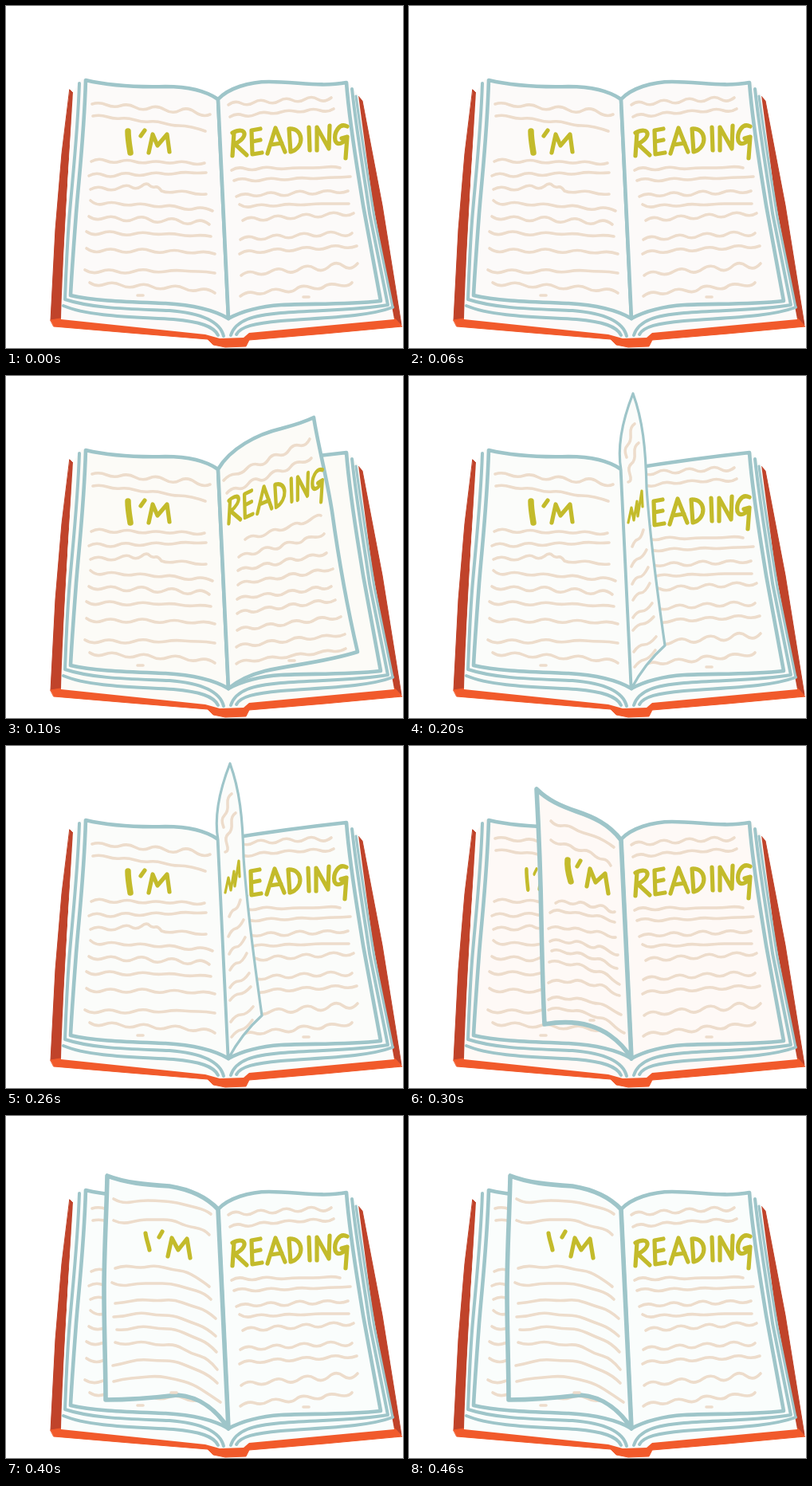
These frames come from a looping animation (498x429 px, 0.5 s). An HTML page:

```html
<!DOCTYPE html>
<html lang="en">
<head>
<meta charset="utf-8">
<title>I'm reading</title>
<style>
html, body { margin: 0; width: 100%; height: 100%; overflow: hidden; background: #fff; }
svg { display: block; width: 100vw; height: 100vh; }
path { stroke-linecap: round; stroke-linejoin: round; stroke-width: var(--w); }
.edge { --w: 4.6; stroke: #9ec5c9; }
.line { --w: 4; stroke: #9ec5c9; fill: none; }
.row { --w: 3.6; stroke: #eddccb; fill: none; }
.word { --w: 5.2; stroke: #c3bb2b; fill: none; }
.bold { --w: 7.5; }
.turn { --w: 5.6; }
.thin { --w: 3.2; }
.cover { --w: 1; fill: #c0432a; stroke: #c0432a; }
.base { --w: 1; fill: #f15a2b; stroke: #f15a2b; }
.pose {
  fill: var(--paper);
  visibility: hidden;
  animation: show .5s step-end infinite;
  animation-delay: calc(var(--i) * .1s - .5s);
}
@keyframes show {
  0% { visibility: visible; }
  20%, 100% { visibility: hidden; }
}
</style>
</head>
<body>
<svg viewBox="0 0 498 429" role="img" aria-label="An open book: I'm reading">
<defs>
  <g id="block">
    <path d="M84 108L95 92 101 92C130 99 160 101 200 101 230 102 250 108 266 117 300 112 380 98 428 94L442 112 459 240 487 393 305 410 298 416 268 417 250 412 69 393C71 320 78 210 84 108Z"/>
    <g class="line">
      <path d="M92 97C90 160 83 220 79 270 76 310 75 345 74 368 110 380 160 380 205 382 242 385 268 394 273 414"/>
      <path d="M72 376C105 390 165 390 210 393 244 396 261 402 266 413"/>
      <path d="M434 104C440 160 449 210 456 260L479 375C440 382 390 381 345 385 310 388 288 394 282 413"/>
      <path class="thin" d="M439 113C446 165 454 215 462 265L485 378"/>
      <path d="M485 378C450 391 390 391 345 395 312 398 294 402 289 412"/>
    </g>
  </g>

  <path id="left" class="edge" d="M266 117C250 106 228 101 200 101 160 102 125 99 100 93 98 160 92 210 88 260 85 300 82 340 81 363 110 370 150 371 200 373 235 375 262 382 279 392 276 330 270 200 266 117Z"/>
  <path id="right" class="edge" d="M266 117C279 103 305 95 330 95 365 95 395 102 427 96 431 150 441 205 448 250L470 370C425 375 380 373 345 375 315 377 294 384 279 392 276 330 270 200 266 117Z"/>
  <path id="next" class="edge" d="M266 118C310 111 345 105 427 96 431 150 441 205 448 250L470 370C425 375 380 373 345 375 315 377 294 384 279 392 276 330 270 200 266 118Z"/>

  <g id="head-l" class="row">
    <path d="M108 123q9-3 18 1t18 1 18 2 18 1 19 2 19 1 19 2 19 3"/>
    <path d="M109 138q9-2 18 1t17 2 18 2 18 2 18 2 18 3 17 2 17 5"/>
  </g>
  <g id="rows-l" class="row">
    <path d="M107 195q9-5 18-1t18 1 18 0 18 1 18 0 17 0 17 1 18 0"/>
    <path d="M104 213q9-5 18-1t18 0 18-1 19 0 18-1 18 0 18-1 20 0"/>
    <path d="M106 230q9-5 18-1t18-1 15-1q6 4 13-1 6-5 10-1 3 3 7 2 4-1 8 5 8 3 18 1t18 1 20 2"/>
    <path d="M106 244q8 7 17 4t19 0 19 1 19 1 19 1 19 2 19 1 22 3"/>
    <path d="M104 264q9 6 19 2t19 1 19 0 19 1 19 1 19 1 18 1 19 3"/>
    <path d="M101 283q9 6 19 2t20 0 20 1 19-1 19 1 20 1 19 1 20 1"/>
    <path d="M101 304q10 7 20 3t20 0 20 0 20 0 20 1 20 0 20 1 21 2"/>
    <path d="M99 331q10 6 20 2t20 0 21 0 20-1 20 1 21-1 20 1 21 2"/>
    <path d="M105 347q9 6 19 2t20 1 20 1 19 1 20 1 20 1 19 2 20 4"/>
    <path d="M165 363h7"/>
  </g>
  <g id="rows-r" class="row">
    <path d="M279 124q8-6 16-2t16-1 16-1 16-1 16-1 16-1 16 0 17-2"/>
    <path d="M281 139q8-5 16-2t16-1 16-2 16-1 17-1 16-1 16 0 17-2"/>
    <path d="M283 206q8-5 17-2t17 0 17-1 17 1 17-1 17 0 17-1 17 1"/>
    <path d="M286 219q9-4 18-1t18 0 18-1 19 0 18-1 18 0 18-1 19-1"/>
    <path d="M289 239q9-5 18-2t17-1 17 0 18-1 17-1 17 0 18-1 18-1"/>
    <path d="M293 249q8 5 17 2t17-1 17 0 17-1 18 0 17-1 17 0 17 0"/>
    <path d="M297 269q9-6 18-2t17-1 17-1 18-1 17-1 17-1 18-1 17-1"/>
    <path d="M294 293q9-6 18-2t18-1 17-1 17-1 18-1 17-1 18 0 17-1"/>
    <path d="M293 311q9-6 18-3t19-1 18-1 18-1 19-1 18-1 18-1 19-1"/>
    <path d="M295 338q9-7 18-3t19-2 18-1 18-2 19-1 18-2 18-1 18-3"/>
    <path d="M294 364q9-7 18-4t17-2 18-1 17-2 18-2 17-1 18-2 17-3"/>
    <path d="M373 365h7"/>
  </g>

  <g id="im" class="word">
    <path class="bold" d="M153 157C153 167 155 177 156 184"/>
    <path d="M174 156L169 163M179 184L184 161 190 175 202 161 205 183"/>
  </g>
  <g id="reading" class="word">
    <path d="M286 159L284 188M284 159C302 150 305 165 287 173L302 187"/>
    <path d="M319 154L308 156 309 186 321 184M309 170L319 168"/>
    <path d="M328 185L338 153 350 183M332 174L346 172"/>
    <path d="M355 154L357 183C375 178 374 153 355 154M380 152L381 181"/>
    <path d="M390 181L390 152 405 179 406 150"/>
    <path d="M428 151C418 146 411 159 413 169 416 176 424 172 428 164L421 166M428 164L426 191"/>
  </g>
</defs>

<path class="cover" d="M80 105L84 109 77 215 72 310 69 394 56 394 62 280 70 185Z"/>
<path class="cover" d="M441 112L447 119 472 250 496 400 487 394 458 240Z"/>
<path class="base" d="M56 394L68 392 250 411 305 409 488 392 497 402 400 411 305 419 301 427 275 428 260 425 253 418 155 410 60 402Z"/>

<g class="pose" style="--i:0;--paper:#fcfaf9">
  <use href="#block"/><use href="#left"/><use href="#right"/>
  <use href="#head-l"/><use href="#rows-l"/><use href="#im"/>
  <use href="#rows-r"/><use href="#reading"/>
</g>

<g class="pose" style="--i:1;--paper:#fcfbf7">
  <use href="#block"/><use href="#next"/><use href="#left"/>
  <use href="#head-l"/><use href="#rows-l"/><use href="#im"/>
  <path class="edge" d="M266 117C281 91 315 73 345 66 360 62 374 58 386 52 391 85 402 125 409 170 418 235 428 290 441 346 400 359 360 362 325 370 305 375 290 383 279 392 276 330 270 200 266 117Z"/>
  <g class="row">
    <path d="M273 131q7-8 15-8t14-7 14-5 13-6 13-6 13-6 13-6 13-8"/>
    <path d="M277 147q7-8 14-6t13-6 13-5 13-5 14-6 13-5 13-6 13-5"/>
    <path d="M300 205q7-6 14-4t14-4 13-4 14-4 13-4 14-5 13-5"/>
    <path d="M292 227q7-6 14-4t13-4 14-3 13-3 14-4 13-3 13-4 13-4"/>
    <path d="M291 244q7-5 14-3t14-3 14-2 14-3 14-3 14-2 14-3 13-3"/>
    <path d="M291 262q7-6 15-4t15-2 15-2 15-3 15-2 15-2 14-3 15-2"/>
    <path d="M290 280q7-5 15-3t15-2 15-1 15-2 15-2 15-2 14-2 14-2"/>
    <path d="M290 298q8-6 15-3t15-2 16-2 15-2 15-2 16-2 15-2 16-2"/>
    <path d="M290 319q8-6 16-3t16-2 16-2 16-2 17-2 16-2 16-2 17-2"/>
    <path d="M289 340q8-6 17-3t17-2 17-2 17-2 17-2 17-1 17-2 17-2"/>
    <path d="M289 361q8-6 17-4t17-2 17-2 18-2 17-2 17-2 17-2 17-3"/>
    <path d="M355 357h7"/>
  </g>
  <use href="#reading" transform="matrix(.815 -.212 0 .99 48 59)"/>
</g>

<g class="pose" style="--i:2;--paper:#fbfcfa">
  <use href="#block"/><use href="#next"/><use href="#left"/>
  <use href="#head-l"/><use href="#rows-l"/><use href="#im"/>
  <use href="#rows-r"/><use href="#reading" transform="translate(-1 1)"/>
  <path class="edge thin" d="M266 118C261 90 268 55 281 22 293 55 297 90 298 140 302 200 312 275 321 338 301 356 289 373 279 392 276 330 270 200 266 118Z"/>
  <g class="row">
    <path d="M283 60q-6 4-5 13t-4 14-1 15"/>
    <path d="M288 84q-6 4-5 13t-4 13-2 13-2 10"/>
    <path d="M280 214q3-8 7-9t7-12"/>
    <path d="M279 239q4-9 9-10t10-11"/>
    <path d="M280 261q4-9 9-9t11-12"/>
    <path d="M281 281q5-9 10-9t11-12"/>
    <path d="M281 303q5-8 11-8t13-10"/>
    <path d="M281 319q6-8 12-8t14-9"/>
    <path d="M282 346q6-9 13-9t15-10"/>
    <path d="M283 365q6-8 12-9t14-12"/>
  </g>
  <path class="word thin" d="M275 184L279 165 282 181 286 157 287 176 292 144 293 164"/>
</g>

<g class="pose" style="--i:3;--paper:#fef9f6">
  <use href="#block"/><use href="#left"/><use href="#right"/>
  <use href="#head-l" y="-7"/><use href="#rows-l"/>
  <use href="#im" transform="matrix(.6 0 0 .9 55.6 14)"/>
  <use href="#rows-r"/><use href="#reading"/>
  <path class="edge turn" d="M266 118C251 98 231 89 210 82 190 75 174 68 160 54 163 110 165 160 166 220 167 270 168 310 170 349 205 343 232 349 252 363 265 372 273 382 279 392 276 330 270 200 266 118Z"/>
  <g class="row">
    <path d="M178 94q6 7 14 6t14 3 13 6 13 4 13 6 12 8"/>
    <path d="M178 118q7 6 14 5t13 4 13 4 13 5 12 6 10 8"/>
    <path d="M184 197q7-5 14-1t13 1 12 2 13 2 12 3 10 4"/>
    <path d="M177 209q7-5 14-2t14 2 14 2 14 2 13 3 12 5"/>
    <path d="M175 229q7-4 15-1t14 1 14 2 14 2 14 3 13 4"/>
    <path d="M177 245q7-4 15 0t14 1 15 3 14 3 14 4 13 6"/>
    <path d="M179 257q7-3 14 1t14 2 14 3 14 4 13 5 13 7"/>
    <path d="M176 271q8-3 16 1t15 2 15 4 15 5 14 6 13 10"/>
    <path d="M175 297q8-5 16-2t15 0 15 2 15 3 14 5 14 8"/>
    <path d="M175 318q8-5 16-2t15 1 16 2 15 4 15 6 14 8"/>
    <path d="M175 331q8-4 17-1t16 2 16 4 16 5 15 8 15 11"/>
    <path d="M227 344h5"/>
  </g>
  <g class="word">
    <path class="bold" d="M199 143C198 153 201 163 203 170"/>
    <path d="M215 144L211 151M223 176L227 154 234 171 246 160 250 185"/>
  </g>
</g>

<g class="pose" style="--i:4;--paper:#fafdfc">
  <use href="#block"/><use href="#left"/><use href="#right"/>
  <use href="#head-l" y="-7"/><use href="#rows-l"/>
  <use href="#rows-r"/><use href="#reading"/>
  <path class="edge turn" d="M266 117C250 100 230 92 205 88 175 86 150 84 127 75 126 125 123 170 123 220 123 270 125 315 125 356 160 356 190 353 215 350 245 352 266 372 279 392 276 330 270 200 266 117Z"/>
  <g class="row">
    <path d="M135 104q10 6 22 4t21-2 21 1 20 3 20 5 18 8"/>
    <path d="M135 131q10 5 22 2t20-3 20 0 20 4 20 6 18 9"/>
    <path d="M137 191q10-4 21-2t20 0 20 1 20 4 20 8 17 12"/>
    <path d="M133 209q10 5 21 3t21-2 21 0 21 3 21 6 19 11"/>
    <path d="M137 235q11-1 21-3t21-1 21 0 21 3 21 7 21 13"/>
    <path d="M135 252q11 0 22-3t21-1 21 2 21 4 21 8 22 14"/>
    <path d="M139 268q11 1 21-2t21-1 21 2 21 5 21 9 20 15"/>
    <path d="M137 284q11 4 22 1t21 0 21 2 21 5 21 9 22 17"/>
    <path d="M134 313q11-2 22-5t22-2 22 1 21 4 22 9 22 15"/>
    <path d="M135 333q11-3 22-4t22-2 22 1 22 5 22 10 24 16"/>
    <path d="M207 347h7"/>
  </g>
  <g class="word">
    <path d="M175 147C176 155 179 162 180 168"/>
    <path d="M196 145L192 152M203 176L208 153 216 168 227 154 231 178"/>
  </g>
</g>
</svg>
</body>
</html>
```
